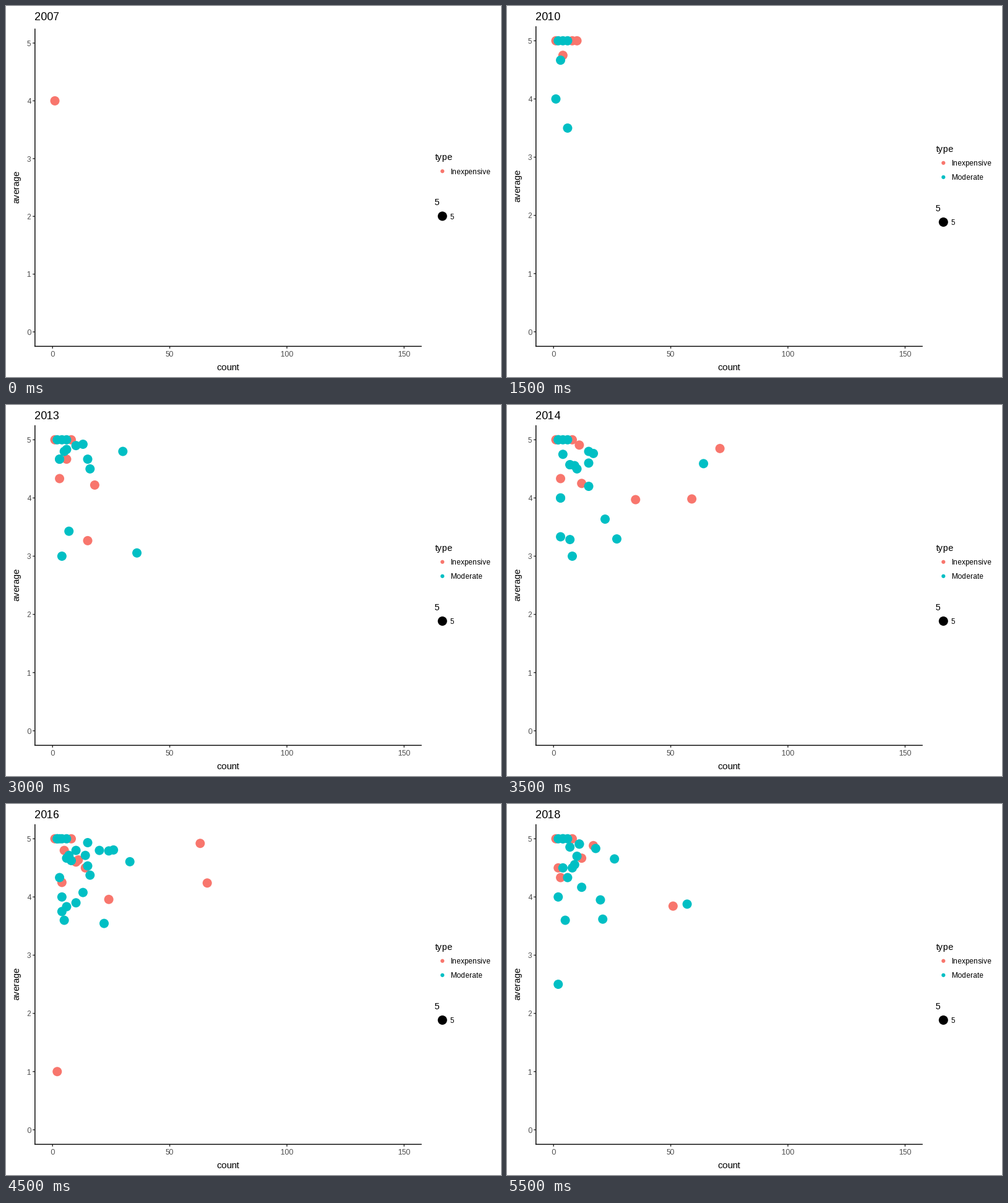
These frames come from a looping animation (800 by 600 pixels, 6 s). A matplotlib script:

```python
import math

import numpy as np
import matplotlib.pyplot as plt
from matplotlib.animation import FuncAnimation
from matplotlib.patches import Circle

plt.rcParams.update({
    "font.family": "Liberation Sans",
    "text.hinting": "force_autohint",
    "text.hinting_factor": 1,
    "text.kerning_factor": 0,
})

WIDTH, HEIGHT, DPI = 800, 600, 96
FIRST_YEAR, YEARS = 2007, 12
LEFT, RIGHT, BOTTOM = 46.8, 671.8, 550.4
SALMON, TEAL = "#F8766D", "#00BFC4"
GREY_TICK, GREY_LABEL = "#333333", "#4D4D4D"
LINE_PX, TICK_PX, DOT_R, KEY_R = 1.42, 3.67, 7.5, 3.1
TITLE_PT, HEAD_PT, LABEL_PT = 13.2, 11, 8.8
KEYS = [("Inexpensive", SALMON), ("Moderate", TEAL)]

# Standout (count, average) points; the rest of each year is generated.
CHEAP_OUTLIERS = {
    2007: [(1, 4)],
    2008: [(5, 5), (6, 23 / 6)],
    2010: [(10, 5), (4, 4.75)],
    2012: [(28, 4.57), (1, 1)],
    2014: [(71, 4.85)],
    2016: [(66, 4.24), (2, 1)],
    2017: [(71, 4.5)],
}
MODERATE_OUTLIERS = {
    2008: [(2, 4.5), (1, 3)],
    2009: [(2, 3)],
    2010: [(1, 4), (6, 3.5)],
    2012: [(7, 16 / 7)],
    2014: [(64, 4.59)],
    2015: [(3, 7 / 3)],
    2018: [(2, 2.5)],
}


def cloud(rng, number, spread):
    """Restaurants skewed to few reviews and high averages."""
    counts = 2 + rng.exponential(spread, number).astype(int)
    averages = 5 - np.minimum(rng.exponential(0.6, number), 2)
    return [(c, round(a * c) / c) for c, a in zip(counts, averages)]


def year_points(year):
    """Cheap and moderate points; activity swells to a peak in 2016."""
    rng = np.random.default_rng(year)
    age = year - FIRST_YEAR
    swell = math.sin(math.pi / 2 * age / 9) ** 4
    spread = 3 + 12 * swell
    cheap = cloud(rng, round(7 * swell), spread)
    moderate = cloud(rng, round(22 * swell), spread)
    if age > 1:
        cheap += [(1, 5), (8, 5)]
        moderate += [(2, 5), (4, 5), (6, 5)]
    return (cheap + CHEAP_OUTLIERS.get(year, []),
            moderate + MODERATE_OUTLIERS.get(year, []))


fig = plt.figure(figsize=(WIDTH / DPI, HEIGHT / DPI), dpi=DPI,
                 facecolor="white")
ax = fig.add_axes([0, 0, 1, 1])


def line(xs, ys, color="black"):
    ax.plot(xs, ys, color=color, lw=LINE_PX * 72 / DPI,
            solid_capstyle="butt", snap=False)


def label(x, y, text, size=LABEL_PT, color="black", **align):
    ax.text(x, y, text, fontsize=size, color=color, va="baseline", **align)


def dot(x, y, color, radius=DOT_R):
    ax.add_patch(Circle((x, y), radius, facecolor=color, edgecolor="none"))


def x_pos(count):
    return LEFT + (count + 7.5) / 165 * (RIGHT - LEFT)


def y_pos(average, top):
    return BOTTOM - (average + 0.25) / 5.5 * (BOTTOM - top)


def draw_axes(top):
    for value in range(6):
        y = y_pos(value, top)
        line([LEFT - TICK_PX, LEFT], [y, y], GREY_TICK)
        label(40, y + 4.8, value, color=GREY_LABEL, ha="right")
    for value in range(0, 151, 50):
        x = x_pos(value)
        line([x, x], [BOTTOM, BOTTOM + TICK_PX], GREY_TICK)
        label(x - 0.5, 567, value, color=GREY_LABEL, ha="center")
    line([LEFT, LEFT], [BOTTOM + LINE_PX / 2, top])
    line([LEFT - LINE_PX / 2, RIGHT], [BOTTOM, BOTTOM])
    label(359, 589, "count", HEAD_PT, ha="center")
    label(21, (top + BOTTOM) / 2 - 0.8, "average", HEAD_PT, ha="center",
          rotation=90, rotation_mode="anchor")


def draw_legend(keys, type_y, size_y):
    label(693, type_y, "type", HEAD_PT)
    for row, (name, color) in enumerate(keys):
        y = type_y + 18.2 + 23 * row
        dot(705.3, y, color, KEY_R)
        label(718, y + 4.5, name)
    label(693, size_y, "5", HEAD_PT)
    dot(705.3, size_y + 17.9, "black")
    label(718, size_y + 22.6, "5")


def update(index):
    ax.clear()
    ax.set(xlim=(0, WIDTH), ylim=(HEIGHT, 0))
    ax.axis("off")
    year = FIRST_YEAR + index
    cheap, moderate = year_points(year)
    top = 32.7 if moderate else 36.6
    for points, (_, color) in zip((cheap, moderate), KEYS):
        for count, average in points:
            dot(x_pos(count), y_pos(average, top), color)
    draw_axes(top)
    label(46, 23, year, TITLE_PT)
    if moderate:
        draw_legend(KEYS, 235.6, 331.6)
    else:
        draw_legend(KEYS[:1], 249, 322)
    return ax.get_children()


anim = FuncAnimation(fig, update, frames=YEARS, interval=500,
                     repeat=True, repeat_delay=0, blit=False)
plt.show()
```
